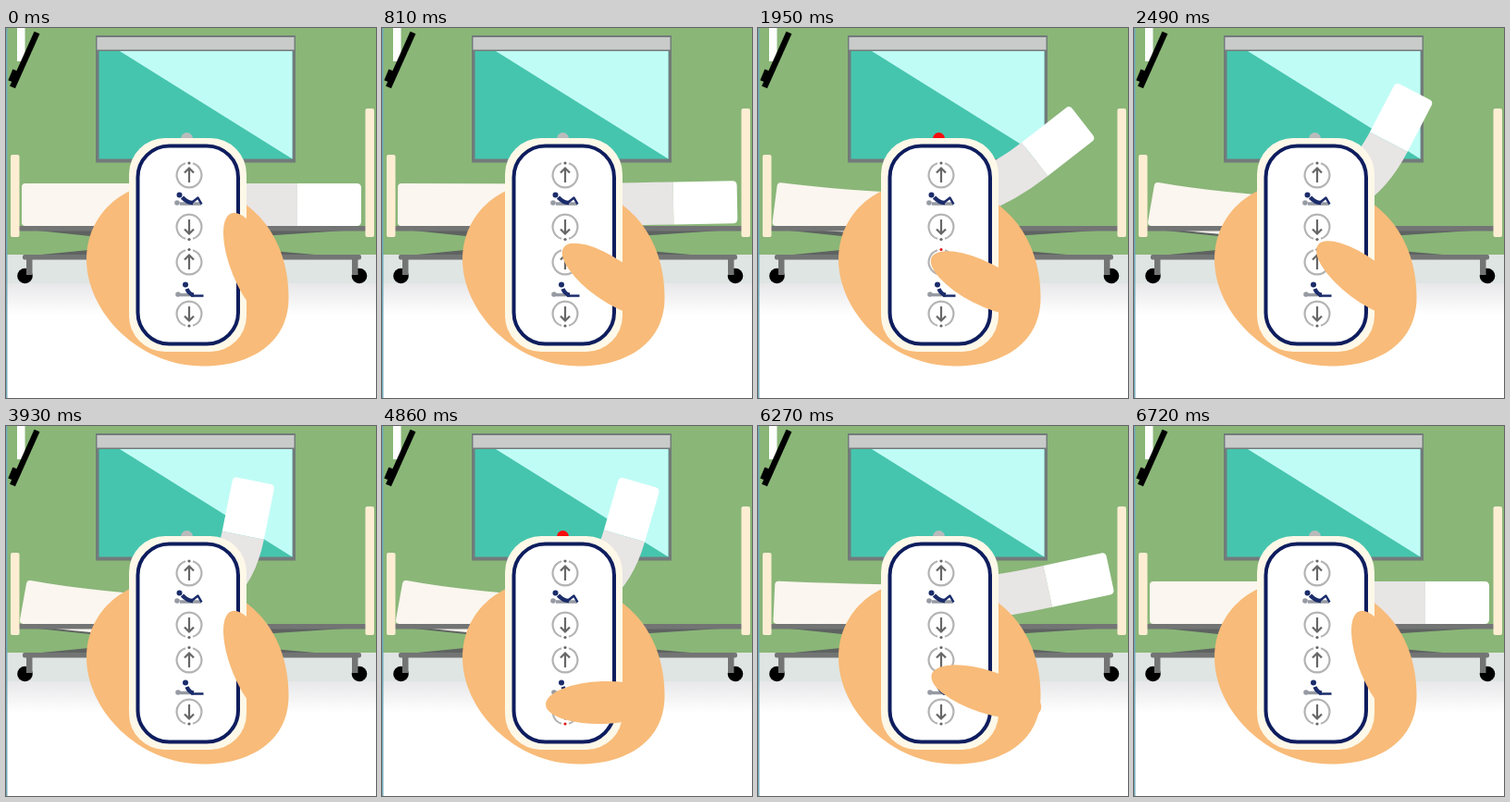
Animation, 400 px wide and 400 px high, one loop 6960 ms. Source, as an HTML page:

```html
<!DOCTYPE html>
<html lang="en">
<head>
<meta charset="utf-8">
<title>Bed remote</title>
<style>
  html, body { margin: 0; width: 100%; height: 100%; overflow: hidden; background: #fff; }
  svg { display: block; width: 100vw; height: 100vh; }
</style>
</head>
<body>
<svg viewBox="0 0 400 400">
  <defs>
    <linearGradient id="shade" x2="0" y2="1">
      <stop stop-color="#e8e7e9"/><stop offset="1" stop-color="#fff"/>
    </linearGradient>
    <g id="button" fill="none" stroke="#b3b3b3" stroke-width="2.2">
      <path d="M4-12.8A13.4 13.4 0 1 1-4-12.8"/>
      <path d="M0 8V-7M-5-2.5L0-7.5L5-2.5" stroke="#666"/>
    </g>
  </defs>

  <!-- room -->
  <rect width="400" height="246" fill="#8ab678"/>
  <rect y="245" width="400" height="31" fill="#dfe5e2"/>
  <rect y="276" width="400" height="34" fill="url(#shade)"/>
  <rect x="97" y="8" width="216" height="137.500" fill="#727b7a"/>
  <rect x="98.500" y="10" width="213" height="13.500" fill="#c9cbca"/>
  <rect x="100.500" y="25" width="209" height="116.500" fill="#46c5ae"/>
  <path d="M123 25H309.500V141.500Z" fill="#c0fcf6"/>
  <rect x="12" width="8.500" height="36" fill="#fff"/>
  <path d="M33.500 5L7 64" stroke="#000" stroke-width="6.500"/>
  <path d="M11 46L6 58" stroke="#000" stroke-width="8"/>
  <rect width="1.500" height="400" fill="#72a9b8"/>

  <!-- bed -->
  <path d="M34 219L110 227V219ZM366 219L260 226V219ZM28 246L110 238V246ZM345 246L255 238V246Z" fill="#5e6361"/>
  <path id="foot" fill="#fbf6ef" stroke="#fbf6ef" stroke-width="8" stroke-linejoin="round"/>
  <path id="bend" fill="#e8e5e5"/>
  <path id="head" fill="#fff"/>
  <g fill="#737575">
    <rect x="14" y="214" width="375" height="5.500"/>
    <rect x="18" y="245" width="366" height="5.500" rx="2"/>
  </g>
  <circle cx="20.500" cy="268" r="8.300"/>
  <circle cx="382" cy="268" r="8.300"/>
  <path d="M22 250h6.500v17h-6.500zM374 250h6.500v17h-6.500z" fill="#737575"/>
  <g fill="#fdeed3">
    <rect x="5" y="137" width="9.500" height="89" rx="2"/>
    <rect x="388.500" y="87" width="9.500" height="139" rx="2"/>
  </g>

  <!-- hand and remote -->
  <path d="M87 250C87 307 143 365.500 213 365.500C268 365.500 305.500 338 305.500 292C305.500 222 262 168 180 166C125 166 87 203 87 250Z" fill="#f8bb79"/>
  <circle id="light" cx="195.500" cy="119.500" r="6.500"/>
  <rect x="133" y="119" width="127" height="231" rx="39" fill="#fdf8e8"/>
  <rect x="142.500" y="127.500" width="108.500" height="214" rx="34" fill="#fff" stroke="#0e1d5e" stroke-width="4"/>
  <use href="#button" x="198" y="159"/>
  <use href="#button" transform="translate(198 215) scale(1 -1)"/>
  <use href="#button" x="198" y="253"/>
  <use href="#button" transform="translate(198 309) scale(1 -1)"/>
  <g fill="#666">
    <circle cx="198" cy="146" r="1.600"/>
    <circle cx="198" cy="228.500" r="1.600"/>
    <circle id="upDot" cx="198" cy="239.500" r="1.600"/>
    <circle id="downDot" cx="198" cy="322" r="1.600"/>
  </g>
  <g fill="none" stroke-linejoin="round">
    <path d="M188 190H211M188 288.500H201" stroke="#969aa2" stroke-width="3.500"/>
    <g stroke="#1b2c6b">
      <path d="M190.500 183Q196 189 202 189M195.500 282Q198 288 203 288.500" stroke-width="4.500"/>
      <path d="M200 189.500L207.500 183.500L211.500 190.500M200 289.500H213.500" stroke-width="2.500"/>
    </g>
  </g>
  <g fill="#969aa2"><circle cx="185" cy="189" r="2.800"/><circle cx="186" cy="288" r="2.800"/></g>
  <g fill="#1b2c6b"><circle cx="187.500" cy="180.500" r="3"/><circle cx="194" cy="277.500" r="3"/></g>
  <ellipse id="thumb" rx="62" ry="23" fill="#f8bb79"/>
</svg>
<script>
const LOOP = 6960;
const THICK = 46, BASE = 214, HIDDEN = 170;
const el = id => document.getElementById(id);

// Backrest angle in degrees over time
const tilt = [
  [640, 0], [1110, 6], [1380, 14], [1830, 32.5], [2490, 62.5], [2900, 74.5],
  [3300, 78], [3650, 78.5], [4500, 78.5], [4710, 77.3], [4860, 74],
  [5430, 48.5], [5820, 31], [6180, 15.5], [6720, 0]
];
// Thumb poses: centre x, centre y, rotation
const rest = [266.5, 258, 68], pressUp = [243, 276, 27], pressDown = [239, 299, -2];

const ease = (t, from, to) => {
  const u = Math.min(1, Math.max(0, (t - from) / (to - from)));
  return u * u * (3 - 2 * u);
};
const within = (t, from, to) => t >= from && t < to;

function slope(i) {
  const a = tilt[i - 1], b = tilt[i + 1];
  return a && b ? (b[1] - a[1]) / (b[0] - a[0]) : 0;
}

function angleAt(t) {
  const i = tilt.findIndex(k => k[0] > t);
  if (i < 1) return 0;
  const [t0, a] = tilt[i - 1], [t1, b] = tilt[i];
  const d = t1 - t0, u = (t - t0) / d, v = 1 - u;
  return a * v * v * (1 + 2 * u) + b * u * u * (1 + 2 * v)
    + d * u * v * (slope(i - 1) * v - slope(i) * u);
}

function drawBed(deg) {
  const a = Math.max(deg, 0.05) * Math.PI / 180;
  const sin = Math.sin(a), cos = Math.cos(a), lift = Math.sin(1.2 * a);

  // Lower and upper edges bend from level to the backrest angle
  const reach = 86 + 7 * (deg / 78) ** 2;
  const hinge = 229 + 0.4 * deg;
  const x = hinge + reach * cos, y = BASE - reach * sin;
  const topX = x - THICK * sin, topY = y - THICK * cos, top = BASE - THICK;
  const topHinge = topX - (top - topY) / sin * cos;
  el('bend').setAttribute('d', `M${HIDDEN} ${BASE}Q${hinge} ${BASE} ${x} ${y}
    L${topX} ${topY}Q${topHinge} ${top} ${HIDDEN} ${top}Z`);

  const len = 69 - 9 * lift ** 3;
  el('head').setAttribute('d', `M0 0H${len - 5}q5 0 5-5V-41q0-5-5-5H0Z`);
  el('head').setAttribute('transform', `translate(${x} ${y}) rotate(${-deg})`);

  el('foot').setAttribute('d', `M${21 + 5 * lift} ${172 - lift}Q90 ${172 + 11 * lift} 205 ${172 + 18 * lift}
    V${210 + 16 * lift}Q83 ${210 + 11 * lift} ${21 - 2 * lift} 210Z`);
}

function drawThumb(t) {
  const up = ease(t, 420, 960) - ease(t, 2310, 2880);
  const down = ease(t, 4200, 4800) - ease(t, 6060, 6660);
  const [x, y, turn] = rest.map((v, i) => v + (pressUp[i] - v) * up + (pressDown[i] - v) * down);
  el('thumb').setAttribute('transform', `translate(${x} ${y}) rotate(${turn})`);
}

function draw() {
  const t = performance.now() % LOOP;
  const up = within(t, 900, 2400), down = within(t, 4680, 6120);
  drawBed(angleAt(t));
  drawThumb(t);
  el('light').setAttribute('fill', up || down ? '#f70d0d' : '#b9bbbb');
  el('upDot').setAttribute('fill', up ? '#e01818' : '#666');
  el('downDot').setAttribute('fill', down ? '#e01818' : '#666');
  requestAnimationFrame(draw);
}
draw();
</script>
</body>
</html>
```
